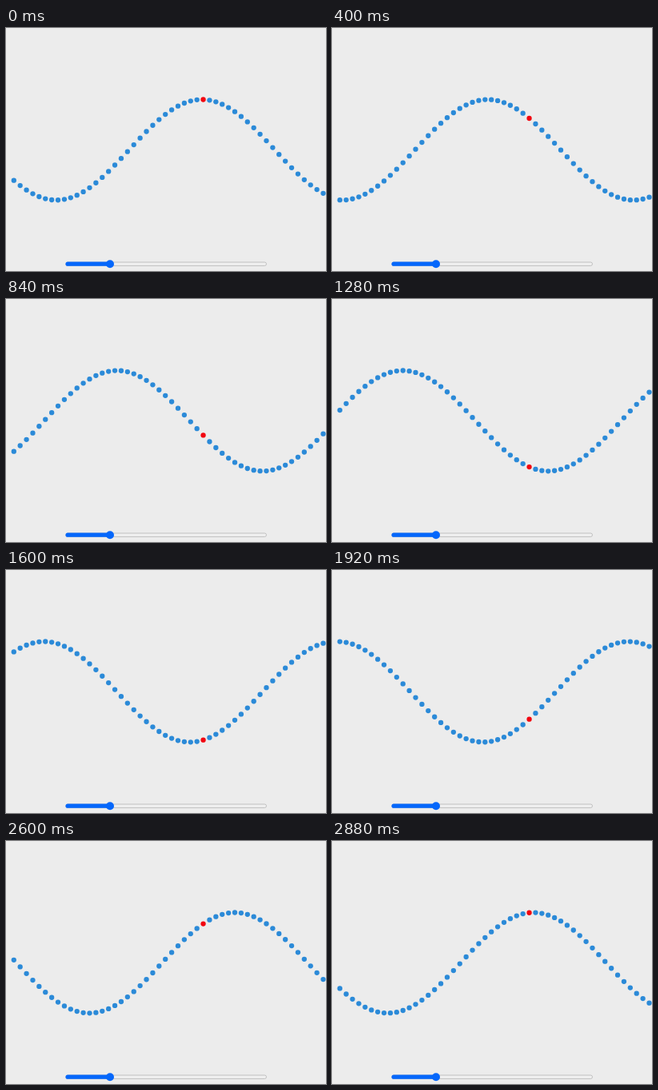
Recreate the animation shown at these times as an HTML page with a canvas. Size 400 px wide and 304 px high, loop 2920 ms.

```html
<!DOCTYPE html>
<html lang="en">
<head>
<meta charset="utf-8">
<title>Travelling wave</title>
<style>
  html, body { margin: 0; width: 100%; height: 100%; overflow: hidden; background: #ececec; }
  canvas { display: block; }
</style>
</head>
<body>
<canvas id="stage" width="400" height="304"></canvas>
<script>
const ctx = document.getElementById('stage').getContext('2d');
const LOOP = 2920, TICK = 40;
const DOTS = 50, MARKED = 30, FIRST_X = 9.8, GAP = 7.892;
const MID_Y = 152.4, HEIGHT = 62.9, WAVELENGTH = 364;

// [tick, phase of the marked dot in degrees]; the pace wavers slightly
const pace = [[0, 1.6], [10, 51.2], [21, 106.7], [32, 156.4],
              [48, 237], [58, 287], [72, 354.8], [73, 361.6]];

function phaseAt(tick) {
  const i = pace.findIndex(([end]) => end > tick);
  const [t0, p0] = pace[i - 1], [t1, p1] = pace[i];
  return p0 + (p1 - p0) * (tick - t0) / (t1 - t0);
}

function dot(x, y, r, color) {
  ctx.fillStyle = color;
  ctx.beginPath();
  ctx.arc(x, y, r, 0, Math.PI * 2);
  ctx.fill();
}

function bar(x, y, w, h, fill, stroke) {
  ctx.beginPath();
  ctx.roundRect(x, y, w, h, h / 2);
  ctx.fillStyle = fill;
  ctx.fill();
  if (stroke) {
    ctx.strokeStyle = stroke;
    ctx.lineWidth = 0.8;
    ctx.stroke();
  }
}

function drawSlider() {
  bar(74.9, 293, 250.6, 4.4, '#f0f0f0', '#b4b4b4');
  bar(74.5, 292.6, 56, 5.2, '#0567fb');
  dot(130, 295.2, 5, '#0567fb');
}

function draw(ms) {
  const phase = phaseAt(Math.floor(ms % LOOP / TICK));
  ctx.fillStyle = '#ececec';
  ctx.fillRect(0, 0, 400, 304);
  for (let i = 0; i < DOTS; i++) {
    const angle = phase + (i - MARKED) * GAP * 360 / WAVELENGTH;
    const y = MID_Y - HEIGHT * Math.cos(angle * Math.PI / 180);
    dot(FIRST_X + i * GAP, y, 3.15, i === MARKED ? '#f20510' : '#2b8ad8');
  }
  drawSlider();
}

const start = performance.now();
function loop() {
  draw(performance.now() - start);
  requestAnimationFrame(loop);
}
loop();
</script>
</body>
</html>
```
